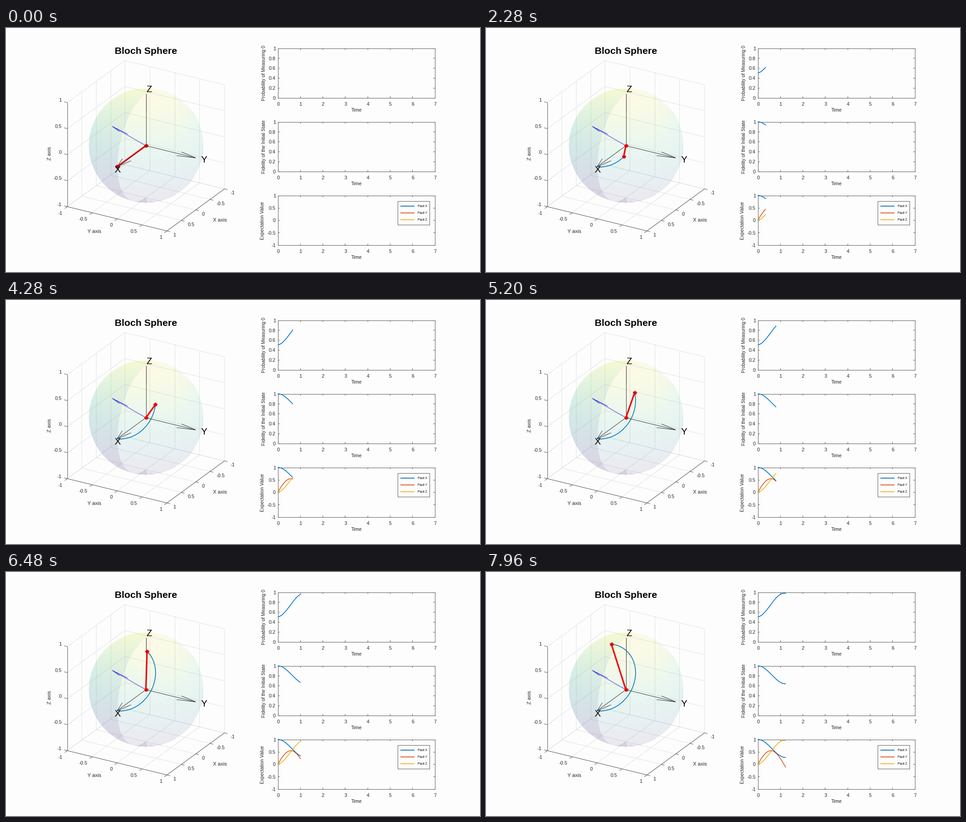
Write a matplotlib script that moves like this. It is 1042 px wide and 537 px high and loops after 8000 ms.

```python
import numpy as np
import matplotlib.pyplot as plt
from matplotlib.animation import FuncAnimation
from matplotlib.collections import LineCollection
from matplotlib.patches import Rectangle

W, H, DPI = 1042, 537, 100
PT = 72 / DPI                      # points per pixel
FRAMES, INTERVAL = 200, 40
INK, GRID = "#262626", "#dfdfe2"
BLUE, ORANGE, YELLOW = "#0072bd", "#d95319", "#edb120"

fig = plt.figure(figsize=(W / 100, H / 100), dpi=DPI, facecolor="#fdfdfd")
ax = fig.add_axes([0, 0, 1, 1])
ax.axis("off")
# Whole coordinates fall on pixel centres, counted from one
ax.set_autoscale_on(False)
ax.set_xlim(0.5, W + 0.5)
ax.set_ylim(H + 0.5, 0.5)


def label(x, y, text, size=10.8, ha="center", rot=0, **kw):
    """Place text with the middle of its capitals at (x, y)."""
    drop = 0.36 * size
    x, y = (x + drop, y) if rot else (x, y + drop)
    kw.setdefault("color", INK)
    ax.text(x + 0.8, y + 0.5, text, fontsize=size * PT, ha=ha, va="baseline",
            rotation=rot, rotation_mode="anchor", family="Liberation Sans",
            zorder=9, **kw)


def lines(segs, color, width, z):
    ax.add_collection(LineCollection(segs, colors=color, linewidths=width * PT,
                                     zorder=z), autolim=False)


def curve(color, width=1.6, z=5):
    return ax.plot([], [], color=color, lw=width * PT, zorder=z,
                   solid_capstyle="butt")[0]


# Orthographic view of the sphere
CENTER, R = np.array([308, 259.6]), 126.4
AZ, EL = np.radians(30), np.radians(25)
RIGHT = np.array([-np.sin(AZ), np.cos(AZ), 0])
UP = np.array([-np.cos(AZ) * np.sin(EL), -np.sin(AZ) * np.sin(EL), np.cos(EL)])
TOWARD = np.cross(RIGHT, UP)


def project(p):
    p = np.asarray(p, float)
    return CENTER + R * np.stack([p @ RIGHT, -(p @ UP)], axis=-1)


def draw_box():
    steps = np.linspace(-1, 1, 5)
    grid = []
    for k in steps:
        grid += [[(-1, k, -1), (-1, k, 1)], [(-1, -1, k), (-1, 1, k)],
                 [(k, -1, -1), (k, -1, 1)], [(-1, -1, k), (1, -1, k)],
                 [(k, -1, -1), (k, 1, -1)], [(-1, k, -1), (1, k, -1)]]
    lines([project(s) for s in grid], GRID, 0.9, 1)

    edges = [[(1, -1, 1), (1, -1, -1)], [(1, -1, -1), (1, 1, -1)],
             [(1, 1, -1), (-1, 1, -1)]]
    segs = [project(s) for s in edges]
    for k in steps:
        for point, tick, shift, ha in (
                ((1, -1, k), (-7, -1.7), (-13, -6), "right"),
                ((1, k, -1), (-5.5, 4), (-11, 13), "right"),
                ((k, 1, -1), (7, 1.7), (13, 8), "left")):
            p = project(point)
            segs.append([p, p + tick])
            label(*(p + shift), f"{k:g}", ha=ha)
    lines(segs, "#484848", 0.9, 1.5)
    label(95, 276, "Z axis", 11.2, rot=90)
    label(194, 447, "Y axis", 11.2)
    label(470, 422, "X axis", 11.2)
    label(307.5, 49, "Bloch Sphere", 21.3, weight="bold", color="black")


def draw_sphere(radius=125.8, alpha=0.1, columns=20):
    x0, x1, y0, y1 = 180, 436, 130, 390
    px, py = np.meshgrid(np.arange(x0, x1, 0.5) + 0.25,
                         np.arange(y0, y1, 0.5) + 0.25)
    a, b = (px - CENTER[0]) / radius, (CENTER[1] - py) / radius
    depth2 = 1 - a**2 - b**2
    flat = a[..., None] * RIGHT + b[..., None] * UP
    rise = np.sqrt(np.maximum(depth2, 0))[..., None] * TOWARD
    front, back = flat + rise, flat - rise

    def column(p):
        turn = np.arctan2(p[..., 1], p[..., 0]) % (2 * np.pi)
        return np.floor(turn / (2 * np.pi) * columns)

    def shade(p):
        return plt.cm.viridis((p[..., 2] + 1) / 2)[..., :3]

    # The far side shows only where its patch is painted before the near one
    cf, cb = column(front), column(back)
    seen = (cb < cf) | ((cb == cf) & (back[..., 2] < front[..., 2]))
    far = np.where(seen, alpha * (1 - alpha), 0)[..., None]
    total = alpha + far
    rgb = (alpha * shade(front) + far * shade(back)) / total
    opacity = np.where(depth2[..., None] > 0, total, 0)
    ax.imshow(np.concatenate([rgb, opacity], axis=-1), aspect="auto",
              extent=(x0, x1, y1, y0), zorder=2)


def arrow(v, color):
    v = np.array(v, float)
    base, side = v * 2 / 3, 0.0866 * np.array([v[1], -v[0], 0])
    segs = [[(0, 0, 0), v], [v, base + side], [v, base - side]]
    lines([project(s) for s in segs], color, 0.9, 3)


# Precession of the state about a tilted axis
AXIS = np.array([0.8, -0.07, 0.6])
AXIS /= np.linalg.norm(AXIS)
OMEGA = 2.54
T = np.arange(FRAMES) * 2 * np.pi / 1000
START = np.array([1.0, 0, 0])
COS, SIN = np.cos(OMEGA * T)[:, None], np.sin(OMEGA * T)[:, None]
STATE = (START * COS + np.cross(AXIS, START) * SIN
         + AXIS * (AXIS @ START) * (1 - COS))
PATH = project(STATE)

LEFT, WIDTH, HEIGHT = 598, 345, 109


def draw_plot(top, low, step, name, name_x):
    bottom, right = top + HEIGHT, LEFT + WIDTH
    segs = [[(LEFT, top), (right, top), (right, bottom), (LEFT, bottom),
             (LEFT, top)]]
    for k in range(8):
        x = LEFT + WIDTH * k / 7
        segs += [[(x, top), (x, top + 3.5)], [(x, bottom), (x, bottom - 3.5)]]
        label(x, bottom + 13, str(k))
    for v in np.arange(low, 1 + step / 2, step):
        y = bottom - HEIGHT * (v - low) / (1 - low)
        segs += [[(LEFT, y), (LEFT + 3.5, y)], [(right, y), (right - 3.5, y)]]
        label(LEFT - 5.5, y, f"{round(v, 1):g}", ha="right")
    lines(segs, "#484848", 0.9, 4)
    label(LEFT + WIDTH / 2, bottom + 26.5, "Time")
    label(name_x, top + HEIGHT / 2, name, 10.45, rot=90)


def draw_legend():
    ax.add_patch(Rectangle((861, 381), 70, 52, fc="#fdfdfd", ec="#484848",
                           lw=0.9 * PT, zorder=6))
    for y, color, name in zip((392, 407, 422), (BLUE, ORANGE, YELLOW), "XYZ"):
        lines([[(867, y), (898, y)]], color, 1.8, 7)
        label(905, y, "Pauli " + name, 6.6, ha="left", color="black")


draw_box()
draw_sphere()
for i, name in enumerate("XYZ"):
    unit = np.eye(3)[i]
    arrow(unit, "#222222")
    label(*project(1.1 * unit), name, 20.5, ha="left", color="black")
arrow(AXIS * OMEGA / 2, "#2222dd")

draw_plot(45, 0, 0.2, "Probability of Measuring 0", 566)
draw_plot(207, 0, 0.2, "Fidelity of the Initial State", 566)
draw_plot(369, -1, 0.5, "Expectation Value", 563)
draw_legend()

# (curve, values, top of its plot, lower limit)
PLOTS = [(curve(BLUE), (1 + STATE[:, 2]) / 2, 45, 0),
         (curve(BLUE), (1 + STATE[:, 0]) / 2, 207, 0)]
PLOTS += [(curve(c), STATE[:, k], 369, -1)
          for k, c in enumerate((BLUE, ORANGE, YELLOW))]

trail = curve(BLUE, 1.6, 5)
shaft = curve("red", 3.4, 6)
ends = ax.plot([], [], ls="", marker="p", ms=7.6 * PT, zorder=7)[0]
dots = ax.plot([], [], ls="", marker="o", ms=2.2 * PT, mew=0, color="#8c0000",
               zorder=8)[0]


def update(i):
    n = i + 1
    for line, values, top, low in PLOTS:
        line.set_data(LEFT + WIDTH * T[:n] / 7,
                      top + HEIGHT * (1 - values[:n]) / (1 - low))
    trail.set_data(*PATH[:n].T)
    red = "#ee0c0c" if i else "#cc0404"
    xs, ys = np.array([CENTER, PATH[i]]).T
    for part in (shaft, ends, dots):
        part.set_data(xs, ys)
    shaft.set_color(red)
    ends.set_color(red)
    return [p[0] for p in PLOTS] + [trail, shaft, ends, dots]


anim = FuncAnimation(fig, update, frames=FRAMES, interval=INTERVAL,
                     init_func=lambda: update(0), repeat=True, repeat_delay=0)
plt.show()
```
